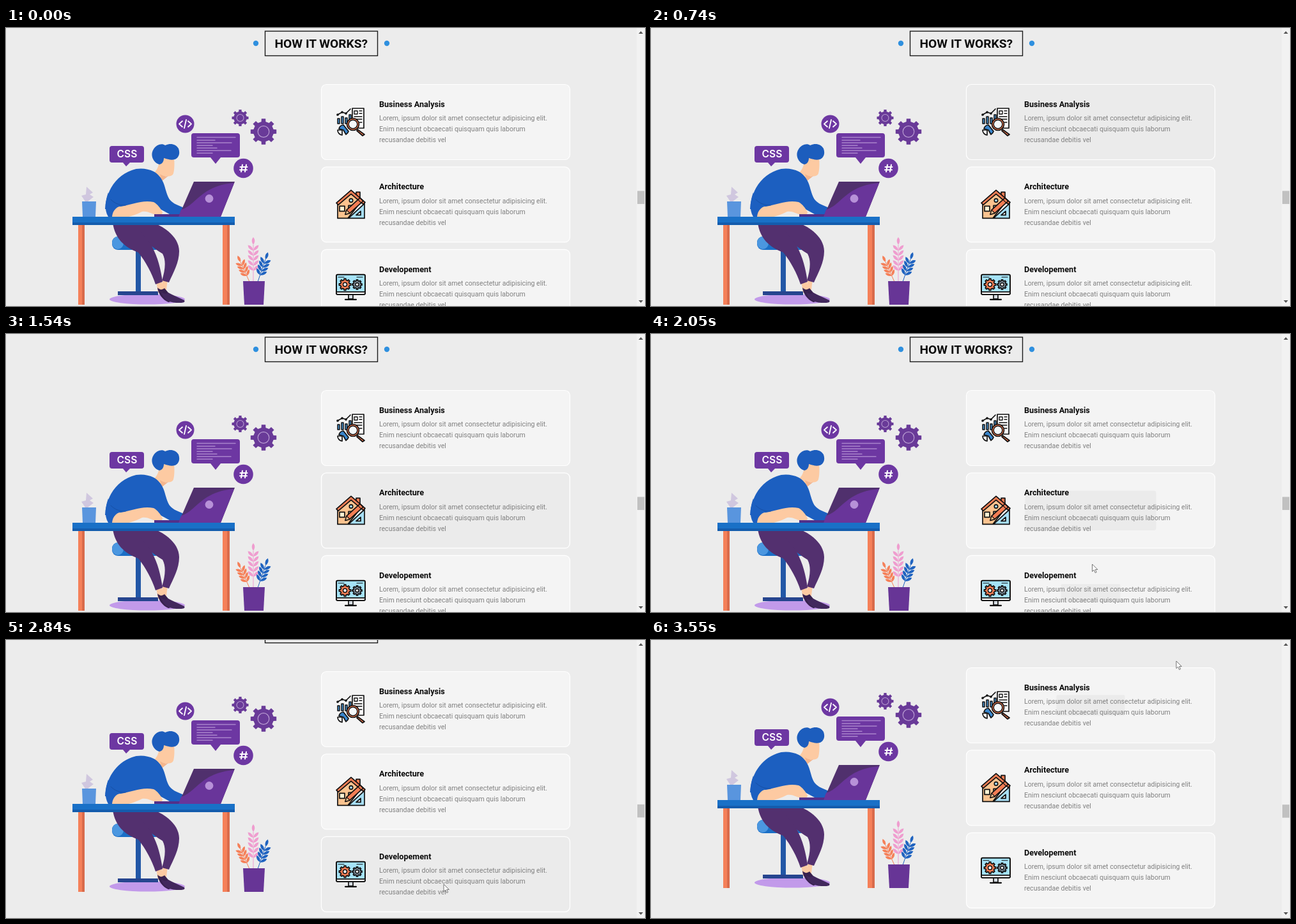
An HTML page that plays this animation: 1000x436 px, repeating every 3.65 s.

```html
<!DOCTYPE html>
<html lang="en">
<head>
<meta charset="utf-8">
<title>How it works</title>
<style>
  html, body { margin: 0; width: 100%; height: 100%; overflow: hidden; background: #ececec; }
  svg { display: block; width: 100%; height: 100%; font-family: Roboto, "Open Sans", sans-serif; }
  .head { font-size: 19.2px; font-weight: 700; fill: #0c0c0c; }
  .name { font-size: 12.6px; font-weight: 700; fill: #0a0a0a; }
  .copy { font-size: 10.58px; fill: #808080; }
  .tag { font: 600 15.6px Inter, sans-serif; fill: #fff; text-anchor: middle; }
  .ink { stroke: #111; stroke-width: 1.7; stroke-linejoin: round; stroke-linecap: round; }
  .line { fill: none; stroke-linecap: round; stroke-linejoin: round; }
</style>
</head>
<body>
<svg viewBox="0 0 1000 436">
  <defs>
    <g id="icon0" class="ink">
      <path d="M542 126h18v31h-18z" fill="#fff"/>
      <path d="M545 130h5v5h-5zM553 130h4M553 134h4M545 139h12M545 143h12M553 148h4" fill="none" stroke-width="1.4"/>
      <g fill="#4a9bdc" stroke-width="1.5">
        <path d="M519 142h3v8h-3zM525 139h3v11h-3zM531 141h3v9h-3zM537 136h3v14h-3z"/>
      </g>
      <path d="M519 136l7-4 6 2 7-7" fill="none"/>
      <g fill="#fff"><circle cx="519" cy="136" r="1"/><circle cx="526" cy="132" r="1"/><circle cx="532" cy="134" r="1"/></g>
      <path d="M526 168a8 8 0 0 1-7-8h7z" fill="#fff"/>
      <path d="M528 152a8 8 0 0 0-7 6l7 2 4 7a8 8 0 0 0 4-5z" fill="#3a86cc"/>
      <path d="M550 159l11 8-3 2-9-8z" fill="#f47e55"/>
      <circle cx="543" cy="151" r="9.5" fill="#f47e55"/>
      <circle cx="543" cy="151" r="6.8" fill="#f4f8fa" stroke-width="1.4"/>
    </g>
    <g id="icon1" class="ink">
      <path d="M519 144l21-16 17 13-22 28h-16z" fill="#fcc38f"/>
      <path d="M548 132v-4h6v9" fill="#f47e55"/>
      <path d="M540 125l-23 20 3 3 20-17 19 16 3-3z" fill="#f47e55"/>
      <circle cx="540" cy="141" r="2.7" fill="#a8dff6"/>
      <path d="M522 150h8v8h-8zM536 149h7v6h-7z" fill="#fff3d4"/>
      <path d="M561 146v23h-25z" fill="#a8dff6"/>
      <path d="M555 158v6h-7z" fill="#f6f6f6"/>
      <path d="M531 163l2-7 21-19 5 5-21 19z" fill="#f47e55"/>
      <path d="M531 163l2-7 5 5zM551 140l5 5" fill="#fcc38f" stroke-width="1.3"/>
    </g>
    <g id="icon2" class="ink">
      <path d="M536 156h7v10h-7z" fill="#d5dce2"/>
      <path d="M531 167h17" stroke-width="2.2"/>
      <rect x="517" y="128" width="45" height="31" rx="2" fill="#a5e3f8" stroke-width="2"/>
      <path d="M517 155h45v2a2 2 0 0 1-2 2h-41a2 2 0 0 1-2-2z" fill="#fff"/>
      <path d="M520 132h9M549 132h9" fill="none" stroke-width="1.1"/>
    </g>
  </defs>
  <rect width="1000" height="436" fill="#ececec"/>

  <g id="page">
    <rect x="405.5" y="5" width="176" height="38.5" fill="none" stroke="#1b1b1b" stroke-width="1.4"/>
    <text class="head" x="420.500" y="31">HOW IT WORKS?</text>
    <g fill="#2f90df"><circle cx="391" cy="24" r="4.2"/><circle cx="596" cy="24" r="4.2"/></g>

    <!-- chair -->
    <ellipse cx="221" cy="425.5" rx="59" ry="8" fill="#c29aea"/>
    <path d="M203 345h8v69h-8z" fill="#2257a6"/>
    <path d="M175 413h63v6h-63z" fill="#26458f"/>
    <rect x="166" y="327" width="77" height="21" rx="9" fill="#1b6fc6"/>
    <ellipse cx="175" cy="337" rx="9" ry="10" fill="#4b97e0"/>

    <!-- legs -->
    <path d="M235 398l8-3 4 17-9 3zM245 392l8 2-3 24-6-1z" fill="#fdcaa2"/>
    <path d="M237 407c4 4 7 4 11 1l11 13c2 5 0 9-5 9-9-4-16-13-17-23z" fill="#38214f"/>
    <path d="M243 414c5 4 8 3 11 1 7 4 17 8 25 12 2 3-2 4-8 4-13 0-24-3-28-17z" fill="#42285d"/>
    <path d="M195 306h37c20 8 39 24 39 44 0 18-9 33-16 49l-11-3c5-16 7-31 1-42-14-9-34-22-50-48z" fill="#53306f"/>
    <path d="M167 306h34c8 14 19 22 27 36 10 18 14 36 17 56l-11 4c-6-18-15-35-27-50-23-9-36-22-40-46z" fill="#53306f"/>

    <!-- table -->
    <path d="M113 308h10v126h-10zM339 308h11v126h-11z" fill="#f58059"/>
    <path d="M119 308h4v126h-4zM346 308h4v126h-4z" fill="#d96b4b"/>

    <!-- body -->
    <path d="M240 204l22-8c2 12 2 24 0 32-2 5-8 5-12 4l-10 6-9-10c6-6 9-13 9-24z" fill="#fdcaa2"/>
    <path d="M241 229c4 3 8 4 13 3l-10 8z" fill="#f4b58d"/>
    <path d="M240 214c-10-3-15-15-9-24 4-7 13-10 18-6 8-4 17-2 21 5 3 8 0 15-6 17-6 2-13-1-17-2 0 5-2 9-7 10z" fill="#1c5dbd"/>
    <path d="M155 284c1-26 16-52 42-61 10-4 24-3 34 2 7 4 12 10 15 17 4 9 5 21 11 28 5 6 13 8 21 12l-4 10h-18l-22-12-36 12h-36c-3-2-5-5-5-8z" fill="#1c5fc0"/>
    <path d="M164 297c-3-10 4-17 16-17 16-3 34-11 51-7 6 3 11 10 14 16 0 3-3 4-6 4-10 0-17-7-26-5-10 5-19 8-27 9z" fill="#fdcaa2"/>
    <path d="M160 258c3 10 11 17 25 20-12 1-18 8-19 18h-6c-7-12-4-26 0-38z" fill="#1c5fc0"/>
    <path d="M164 269c6 6 13 9 23 9" class="line" stroke="#1750a5"/>

    <!-- laptop -->
    <path d="M232 292h42v4h-42z" fill="#52308a"/>
    <path d="M294 241h64l-22 55h-66z" fill="#50306d"/>
    <path d="M357 243l-21 53h-66l4-11c24-7 31-38 83-42z" fill="#69359a"/>
    <circle cx="318" cy="267.5" r="6.4" fill="#b791d8"/>
    <path d="M104 296h254v13H104z" fill="#1970c7"/>
    <path d="M104 305h254v4H104z" fill="#145cad"/>

    <!-- mug -->
    <path d="M126 249l10 9-5 3 6 4-9 7h-4l-6-9 7-2z" fill="#d0c7df"/>
    <path d="M119 272h22l-1 24h-20z" fill="#5995de"/>

    <!-- bubbles -->
    <g fill="#6d37a2">
      <path d="M166 185h46q4 0 4 4v18q0 4-4 4h-18l-6 6-5-6h-17q-4 0-4-4v-18q0-4 4-4z"/>
      <path d="M294 165h68q4 0 4 4v30q0 4-4 4h-26l-8 10-8-10h-26q-4 0-4-4v-30q0-4 4-4z"/>
      <circle cx="280.5" cy="150.5" r="14"/>
      <circle cx="371.500" cy="220" r="15.3"/>
    </g>
    <text class="tag" x="189.500" y="203">CSS</text>
    <path class="line" stroke="#fff" stroke-width="1.8" d="M276 146l-5 4.500 5 4.500M285 146l5 4.500-5 4.500M282 144l-3 13"/>
    <path class="line" stroke="#fff" stroke-width="2" d="M370 214.500l-2 11M376 214.500l-2 11M366.500 218h11M366 222.500h11"/>
    <path class="line" stroke="#a983cc" stroke-width="1.4" d="M299 171.500h60M299 176h28M299 180h54M299 184.300h24M299 188.300h31M299 192.300h53M299 196.300h24"/>

    <g id="gears"></g>
    <g id="plant"></g>
    <path d="M371 397h34l-2 37h-30z" fill="#673596"/>
    <g id="cards"></g>
  </g>

  <!-- scrollbar -->
  <rect x="987" width="13" height="436" fill="#f2f2f2"/>
  <path d="M990 9l3.500-4 3.500 4zM990 427l3.500 4 3.500-4z" fill="#555"/>
  <rect id="thumb" x="988" y="255.500" width="11" height="20.500" fill="#c1c1c1"/>
  <path id="arrow" d="M0 0v11.500l2.700-2.400 2 4.400 2-.9-2-4.200h3.700z" fill="#fff" stroke="#666" stroke-width=".9"/>
</svg>

<script>
const $ = id => document.getElementById(id);
const LOOP = 3650;

function gear(x, y, r, teeth, fill, extra = '') {
  let d = '';
  for (let i = 0; i < teeth; i++) {
    [[-.27, .78], [-.2, 1], [.2, 1], [.27, .78]].forEach(([a, k]) => {
      const w = (i + a) * 2 * Math.PI / teeth;
      d += (d ? 'L' : 'M') + (x + r * k * Math.sin(w)).toFixed(1) + ' ' + (y - r * k * Math.cos(w)).toFixed(1);
    });
  }
  return `<path d="${d}z" fill="${fill}" ${extra}/>`;
}

function ring(x, y, r, fill, stroke, width) {
  return `<circle cx="${x}" cy="${y}" r="${r}" fill="${fill}" stroke="${stroke}" stroke-width="${width}"/>`;
}

// A stem with pairs of leaves and one at the tip
function sprig(x, y, tx, ty, pairs, size, fill) {
  const lean = Math.atan2(tx - x, y - ty) * 180 / Math.PI;
  const leaf = (px, py, turn) =>
    `<path d="M0 0q${-size * .38} ${-size * .55} 0 ${-size}q${size * .38} ${size * .45} 0 ${size}z" transform="translate(${px} ${py}) rotate(${lean + turn})"/>`;
  let out = `<path d="M${x} ${y}L${tx} ${ty}" stroke="${fill}" stroke-width="1"/>`;
  for (let i = 0; i < pairs; i++) {
    const k = .3 + .68 * i / pairs;
    const px = x + (tx - x) * k, py = y + (ty - y) * k;
    out += leaf(px, py, -45) + leaf(px, py, 45);
  }
  return `<g fill="${fill}">${out}${leaf(tx, ty, 0)}</g>`;
}

$('gears').innerHTML =
  gear(366.5, 141, 13.2, 8, '#693a98') + ring(366.5, 141, 5.5, 'none', '#b99cd2', 1.1) +
  gear(403, 162.5, 20.5, 8, '#693a98') + ring(403, 162.5, 8.8, 'none', '#b99cd2', 1.2);

$('plant').innerHTML =
  sprig(387, 398, 387, 340, 5, 12, '#ef9dcf') +
  sprig(381, 398, 367, 367, 4, 11, '#f58059') +
  sprig(394, 398, 406, 363, 4, 12, '#1f63c0');

$('icon2').innerHTML +=
  gear(530.5, 143.5, 9.2, 8, '#f47e55', 'stroke-width="1.7"') + ring(530.5, 143.5, 3, '#fff', '#111', 1.5) +
  gear(549.5, 143.5, 7.6, 8, '#7b8b98', 'stroke-width="1.7"') + ring(549.5, 143.5, 2.5, '#fff', '#111', 1.4);

const copy = [
  'Lorem, ipsum dolor sit amet consectetur adipisicing elit.',
  'Enim nesciunt obcaecati quisquam quis laborum',
  'recusandae debitis vel'
];
$('cards').innerHTML = ['Business Analysis', 'Architecture', 'Developement'].map((name, i) => `
  <g transform="translate(0 ${i * 129.4})">
    <rect x="493.5" y="88.500" width="389" height="118" rx="8" fill="#f4f4f4"/>
    <rect class="fill" x="-194.5" y="-59" width="389" height="118" rx="7" fill="#ebebeb"/>
    <rect x="493.5" y="88.500" width="389" height="118" rx="8" fill="none" stroke="#fff" stroke-width="1.2"/>
    <use href="#icon${i}"/>
    <text class="name" x="584" y="124">${name}</text>
    ${copy.map((s, n) => `<text class="copy" x="584" y="${145.2 + n * 17}">${s}</text>`).join('')}
  </g>`).join('');
const fills = document.querySelectorAll('.fill');

// Hover changes per card: start, duration, from, to
const hovers = [
  [[175, 400, 0, 1], [1140, 400, 1, 0], [3150, 400, 0, 1], [3400, 365, .91, 0]],
  [[1180, 400, 0, 1], [1938, 400, 1, 0]],
  [[1980, 400, 0, 1], [3085, 400, 1, 0]]
];

// Pointer path: time, x, y
const path = [
  [1750, 694, 293], [1938, 692, 336], [2050, 690.5, 361], [2230, 686, 382], [2560, 685, 383],
  [3040, 685, 383], [3150, 720, 161], [3400, 815, 43], [3550, 822, 33]
];

const holds = [
  [0, 210], [340, 410], [640, 740], [740, 880], [880, 1140], [1140, 1160], [1650, 1750], [2050, 2140],
  [2230, 2380], [2380, 2560], [2560, 2590], [2840, 2950], [3040, 3320], [3550, 3650]
];

const clamp = v => Math.max(0, Math.min(1, v));
const bez = (u, a, b) => 3 * u * (1 - u) ** 2 * a + 3 * u * u * (1 - u) * b + u ** 3;

// cubic-bezier(.25, .1, .25, 1)
function ease(x) {
  let lo = 0, hi = 1;
  for (let i = 0; i < 18; i++) {
    const mid = (lo + hi) / 2;
    if (bez(mid, .25, .25) < x) lo = mid; else hi = mid;
  }
  return bez(lo, .1, 1);
}

function hover(list, t) {
  const step = list.filter(s => s[0] <= t).pop();
  if (!step) return 0;
  const [start, span, from, to] = step;
  return from + (to - from) * ease(clamp((t - start) / span));
}

function scroll(t) {
  const u = clamp((t - 2470) / 500);
  return 45 * (u < .5 ? 2 * u * u : 1 - 2 * (1 - u) ** 2);
}

function pointer(t) {
  let i = 0;
  while (i < path.length - 2 && path[i + 1][0] <= t) i++;
  const a = path[i], b = path[i + 1], k = clamp((t - a[0]) / (b[0] - a[0]));
  return [a[1] + (b[1] - a[1]) * k, a[2] + (b[2] - a[2]) * k];
}

function draw(now) {
  let t = now % LOOP;
  const hold = holds.find(h => t >= h[0] && t < h[1]);
  if (hold) t = hold[0];
  const y = scroll(t);
  $('page').setAttribute('transform', `translate(0 ${-Math.round(y)})`);
  $('thumb').setAttribute('transform', `translate(0 ${y * .06})`);
  fills.forEach((el, i) => {
    const s = hover(hovers[i], t);
    el.setAttribute('transform', `translate(688 147.5) scale(${s})`);
    el.style.display = s > .005 ? '' : 'none';
  });
  const [px, py] = pointer(t);
  $('arrow').setAttribute('transform', `translate(${px} ${py})`);
  $('arrow').style.display = t < 1750 ? 'none' : '';
}

const begin = performance.now();
(function tick() {
  draw(performance.now() - begin);
  requestAnimationFrame(tick);
})();
</script>
</body>
</html>
```
